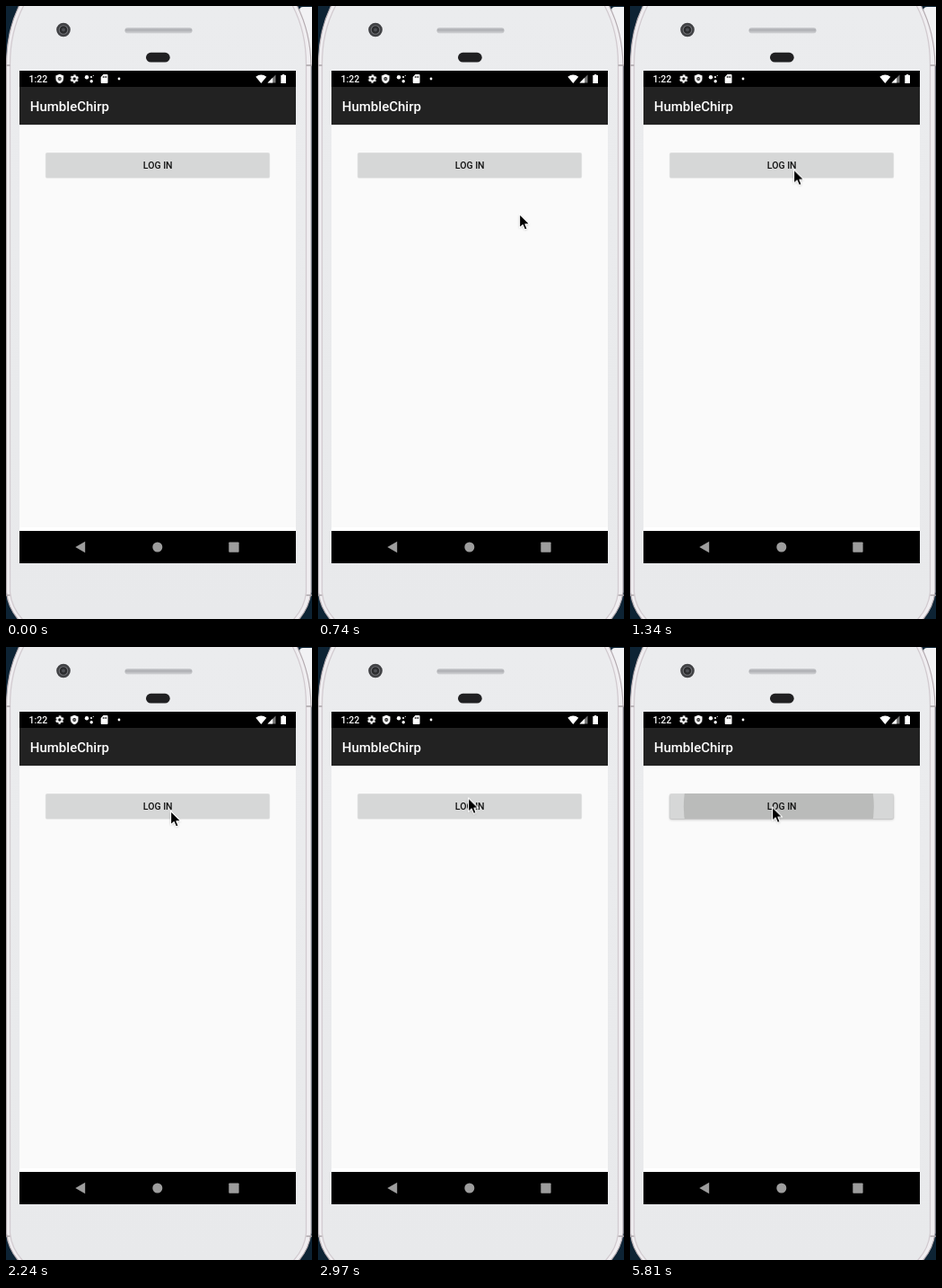
An HTML page that plays this animation: 341 by 682 pixels, repeating every 8 s.

```html
<!DOCTYPE html>
<html lang="en">
<head>
<meta charset="utf-8">
<title>Log in</title>
<style>
html, body { margin: 0; width: 100%; height: 100%; overflow: hidden; background: #0d2334; }
svg { display: block; width: 341px; height: 682px; }
text { font-family: Roboto, "Open Sans", sans-serif; }
.medium { font-weight: 500; }
#cursor, #shield, #gear, #ripple, #lift { animation: 8s step-end infinite; }
#cursor { animation-name: point; }
#shield { animation-name: shield; }
#gear { animation-name: gear; }
#ripple, #lift { animation-name: press; }

@keyframes point {
  0% { transform: translate(263px, 263px); opacity: 0; }
  5.625% { transform: translate(263px, 263px); opacity: 1; }
  7.375% { transform: translate(258px, 266px); }
  9.25% { transform: translate(224px, 231px); }
  11.125% { transform: translate(182px, 185px); }
  14.875% { transform: translate(182px, 183px); }
  16.75% { transform: translate(182px, 181.5px); }
  28% { transform: translate(183px, 182px); }
  29.75% { transform: translate(184px, 179px); }
  31.625% { transform: translate(186px, 168px); }
  33.5% { transform: translate(178px, 164px); }
  35.25% { transform: translate(167px, 168px); }
  37.125% { transform: translate(167px, 167.5px); }
  42.75% { transform: translate(159px, 178px); }
  44.625%, 100% { transform: translate(158px, 177.5px); opacity: 1; }
}
@keyframes shield {
  0% { transform: translate(59.7px, 81px); }
  9.25% { transform: translate(75.3px, 81px); }
  11.125%, 100% { transform: translate(76.2px, 81px); }
}
@keyframes gear {
  0% { transform: translate(76.2px, 81px); }
  9.25% { transform: translate(60.6px, 81px); }
  11.125%, 100% { transform: translate(59.7px, 81px); }
}
@keyframes press {
  0% { opacity: 0; }
  72.625%, 100% { opacity: 1; }
}
</style>
</head>
<body>
<svg viewBox="0 0 341 682">
  <defs>
    <linearGradient id="shell" x1="0" y1="0" x2="0" y2="1">
      <stop offset="0" stop-color="#ebecee"/>
      <stop offset="1" stop-color="#e8e9eb"/>
    </linearGradient>
    <linearGradient id="grille" x1="0" y1="0" x2="0" y2="1">
      <stop offset="0" stop-color="#cfd0d3"/>
      <stop offset=".4" stop-color="#adaeb2"/>
      <stop offset="1" stop-color="#d4d5d8"/>
    </linearGradient>
    <clipPath id="face"><rect x="44.5" y="163.5" width="249" height="27.5" rx="1.5"/></clipPath>
    <filter id="soft" x="-10%" y="-40%" width="120%" height="180%"><feGaussianBlur stdDeviation="1"/></filter>
    <filter id="blur" x="-40%" y="-40%" width="180%" height="180%"><feGaussianBlur stdDeviation=".9"/></filter>
  </defs>

  <!-- desktop -->
  <rect width="341" height="682" fill="#0d2334"/>
  <path d="M345 1H331Q327 1 327 5V66H345Z" fill="#f2f2f4"/>

  <!-- phone shell -->
  <path d="M15-1Q.5 28 .5 65V652Q2 669 14 683H326Q338 669 340 652V65Q339 28 324-1Z"
        fill="#f0eef1" stroke="#b5acb1" stroke-width="1.2"/>
  <path d="M20-1Q4.500 28 4.500 65V652Q6 669 19 683H320Q333 669 334.500 652V65Q334.500 28 319-1Z"
        fill="url(#shell)" stroke="#d2cbd0" stroke-width="1.3"/>
  <path d="M0 66H4.500M334.500 66H341M0 655.500H4.500M334.500 655.500H341" stroke="#aaa4a8" stroke-width="1.5"/>

  <circle cx="64" cy="26.500" r="7.800" fill="#404144"/>
  <circle cx="64" cy="26.500" r="4.800" fill="#292a2c" stroke="#6f7074" stroke-width="1.100"/>
  <circle cx="64" cy="26.500" r="2" fill="#4c4e53"/>
  <rect x="132.500" y="24" width="75" height="6.500" rx="3.200" fill="url(#grille)"/>
  <rect x="156" y="51.800" width="26.700" height="10.800" rx="5.400" fill="#202022"/>

  <!-- screen -->
  <rect x="15" y="72" width="308" height="548" fill="#fafafa"/>
  <rect x="15" y="580" width="308" height="4" fill="#fff"/>
  <rect x="15" y="72" width="308" height="18.500" fill="#000"/>
  <rect x="15" y="90" width="308" height="42" fill="#222"/>
  <rect x="15" y="132" width="308" height="1" fill="#e4e4e4"/>
  <rect x="15" y="584" width="308" height="36" fill="#000"/>

  <!-- status bar -->
  <g fill="#fff">
    <text class="medium" x="25.500" y="85" font-size="10.5">1:22</text>
    <g id="shield">
      <path d="M0-5.200 4.300-3.500V-.3C4.300 2.500 2.500 4.400 0 5.200-2.500 4.400-4.300 2.500-4.300-.3V-3.500Z"/>
      <circle r="1.900" fill="#000"/>
      <circle r=".8"/>
    </g>
    <g id="gear">
      <circle r="2.600" fill="none" stroke="#fff" stroke-width="1.900"/>
      <circle r="3.900" fill="none" stroke="#fff" stroke-width="1.600" stroke-dasharray="2.200 1.884" stroke-dashoffset="1.100" transform="rotate(30)"/>
    </g>
    <circle cx="90" cy="79.300" r="2.200"/>
    <circle cx="95" cy="79" r="1.100"/>
    <circle cx="95.200" cy="83.700" r="1.700"/>
    <circle cx="97.300" cy="77.500" r=".6"/>
    <path d="M108.500 76H112.500Q113.500 76 113.500 77V85Q113.500 86 112.500 86H106.700Q105.700 86 105.700 85V79Z"/>
    <path d="M108.300 78V80M110 78V80M111.700 78V80" stroke="#000" stroke-width=".8"/>
    <circle cx="126" cy="81" r="1.400"/>
    <path d="M278.300 78.800Q284.300 74.200 290.300 78.800L284.300 86Z"/>
    <path d="M300.500 76.500V85.500H291.500Z" fill="#777"/>
    <path d="M297.200 79.800V85.500H291.500Z"/>
    <path d="M308 76H310.300V77H312V86H306.300V77H308Z"/>
  </g>

  <text class="medium" x="26.800" y="117" font-size="15" fill="#fff">HumbleChirp</text>

  <!-- button -->
  <rect id="lift" x="44" y="164.500" width="250" height="28" rx="2" fill="#000" fill-opacity=".18" filter="url(#soft)"/>
  <rect x="43.800" y="163" width="250.400" height="28.800" rx="2" fill="#000" fill-opacity=".09"/>
  <rect x="44.500" y="163.500" width="249" height="27.500" rx="1.500" fill="#d6d7d7"/>
  <g clip-path="url(#face)">
    <circle id="ripple" cx="165.800" cy="177.500" r="106" fill="#babbba"/>
  </g>
  <text class="medium" x="169.200" y="181" font-size="10.5" text-anchor="middle" fill="#101010">LOG IN</text>

  <!-- navigation -->
  <g fill="#9d9d9d">
    <path d="M77.300 602 88.200 595.800V608.200Z"/>
    <circle cx="168.800" cy="602" r="5.500"/>
    <rect x="248.300" y="596.500" width="11.300" height="11.300" rx=".8"/>
  </g>

  <g id="cursor">
    <path d="M.5 1.500V16.500L4 13.500 6.500 18.500 9.200 17.500 7 12.500H11.700Z" fill="#000" fill-opacity=".3" filter="url(#blur)"/>
    <path d="M.6.500V15.800L4.100 12.600 6.500 17.900 9.200 16.700 6.900 11.700H11.700Z" fill="#000" stroke="#fff" stroke-width="1.100" stroke-linejoin="round"/>
  </g>
</svg>
</body>
</html>
```
